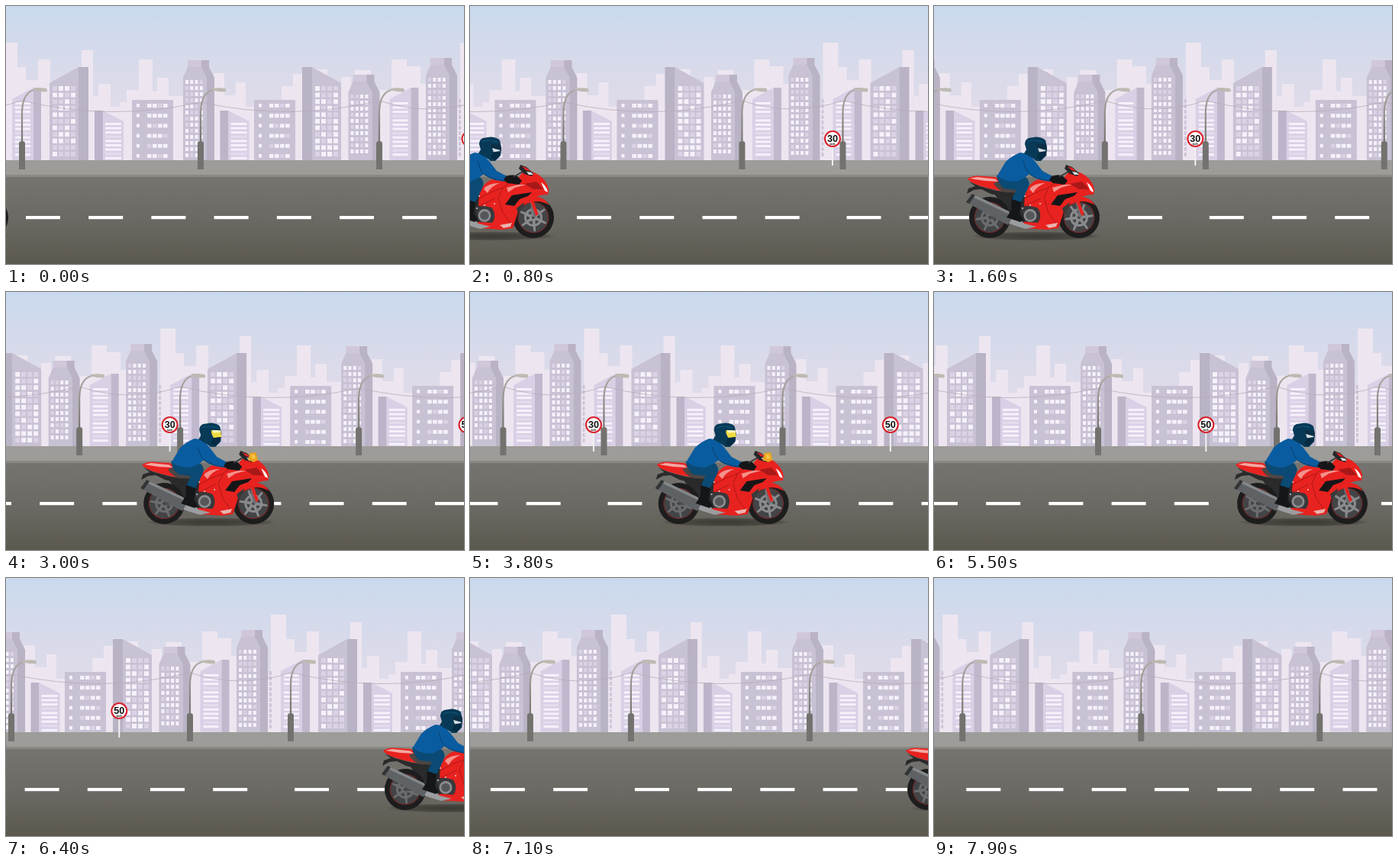
Write an HTML page with a canvas that moves like this. It is 600 by 338 pixels and loops after 8000 ms.

```html
<!DOCTYPE html>
<html lang="en">
<head>
<meta charset="utf-8">
<title>City ride</title>
<style>
  html, body { margin: 0; width: 100%; height: 100%; overflow: hidden; }
  canvas { display: block; width: 600px; height: 338px; }
</style>
</head>
<body>
<canvas id="stage" width="600" height="338"></canvas>
<script>
const ctx = document.getElementById('stage').getContext('2d');
const LOOP = 8000, TICK = 100, TILE = 600, GROUND = 202;

// [time, value] pairs, joined by straight lines
const SCROLL = [[0, 0], [1955, 324], [5000, 524.6], [5500, 640], [6400, 848], [7730, 1156], [8000, 1200]];
const RIDE = [[0, -214], [1955, 47.5], [5100, 308.5], [5500, 351], [6400, 450], [8000, 626]];
const ALERT = [1955, 5000];

const FACE = '#c9c1d4', SIDE = '#bab2c5', PALE = '#d9d0e6', LIT = '#f6f1fa', DIM = '#dbd3e5';
const RED = '#e8221f', DEEP = '#a81818', BLACK = '#151618';

function track(keys, t) {
  let i = 1;
  while (i < keys.length - 1 && t > keys[i][0]) i++;
  const [t0, a] = keys[i - 1], [t1, b] = keys[i];
  return a + (b - a) * (t - t0) / (t1 - t0);
}

function rect(x, y, w, h, color) {
  ctx.fillStyle = color;
  ctx.fillRect(x, y, w, h);
}

function poly(color, ...p) {
  ctx.fillStyle = color;
  ctx.beginPath();
  for (let i = 0; i < p.length; i += 2) ctx.lineTo(p[i], p[i + 1]);
  ctx.fill();
}

function shape(color, d) {
  ctx.fillStyle = color;
  ctx.fill(new Path2D(d));
}

function stroke(color, width, d) {
  ctx.strokeStyle = color;
  ctx.lineWidth = width;
  ctx.stroke(new Path2D(d));
}

function disc(x, y, r, color) {
  ctx.fillStyle = color;
  ctx.beginPath();
  ctx.arc(x, y, r, 0, Math.PI * 2);
  ctx.fill();
}

function ring(r, width, color) {
  ctx.strokeStyle = color;
  ctx.lineWidth = width;
  ctx.beginPath();
  ctx.arc(0, 0, r, 0, Math.PI * 2);
  ctx.stroke();
}

function fade(y0, y1, ...colors) {
  const g = ctx.createLinearGradient(0, y0, 0, y1);
  colors.forEach((c, i) => g.addColorStop(i / (colors.length - 1), c));
  return g;
}

const SKY = fade(0, GROUND, '#c9d9ed', '#d6daeb', '#e0dbe9', '#e8dfeb');
const ROAD = fade(224, 338, '#757470', '#6b6963', '#5b584e');
const POLE = fade(108, 178, '#aeaba5', '#77756f');

function windows(x, y, cols, w, dx, h, dy, seed, share) {
  for (let r = 0; y + r * dy + h < 200; r++) {
    for (let c = 0; c < cols; c++) {
      const n = Math.sin(seed * 17.3 + r * 12.9898 + c * 78.233) * 43758.5453;
      rect(x + c * dx, y + r * dy, w, h, n - Math.floor(n) < share ? LIT : DIM);
    }
  }
}

function bars(x, y, w) {
  for (let i = 0; y + i * 5.6 < 198; i++) rect(x, y + i * 5.6, w, 3, i % 4 === 3 ? '#e3dced' : LIT);
}

// Left, right and top of the hazy towers
const HAZE = [
  -5, 15, 48, 15, 26, 80, 26, 42, 97, 42, 58, 70, 99, 114, 58, 114, 121, 118,
  121, 137, 102, 149, 158, 126, 158, 174, 110, 174, 192, 70, 192, 198, 112,
  198, 213, 94, 213, 232, 118, 272, 286, 88, 286, 301, 117, 301, 314, 100,
  361, 376, 105, 376, 388, 89, 405, 421, 83, 439, 452, 93, 457, 478, 84,
  489, 505, 110, 505, 525, 70, 525, 543, 79, 543, 552, 102
];

function haze() {
  rect(0, 132, TILE, 70, '#ede6f0');
  for (let i = 0; i < HAZE.length; i += 3) {
    const [l, r, top] = HAZE.slice(i, i + 3);
    rect(l, top, r - l, GROUND - top, '#ede6f0');
  }
}

function slantLow(x) {
  poly(PALE, x, GROUND, x, 122, x + 28, 107, x + 28, GROUND);
  rect(x + 28, 107, 10, GROUND - 107, '#c1b8cd');
  bars(x + 4, 126, 20);
}

function slantTall(x, flip) {
  ctx.save();
  ctx.translate(x + (flip ? 51 : 0), 0);
  if (flip) ctx.scale(-1, 1);
  poly(FACE, 0, GROUND, 0, 101, 38, 80, 38, GROUND);
  rect(38, 80, 13, GROUND - 80, SIDE);
  windows(4, 105, 4, 6, 8, 6, 8.6, flip ? 8 : 3, 0.45);
  ctx.restore();
}

function annex(x) {
  rect(x, 137, 11, GROUND - 137, '#bdb4c9');
  poly(PALE, x + 11, GROUND, x + 11, 137, x + 38, 151, x + 38, GROUND);
  bars(x + 14, 153, 21);
}

function block(x) {
  rect(x, 123, 54, GROUND - 123, FACE);
  for (let y = 128; y < 197; y += 13.2) {
    rect(x + 6, y, 4, 4.6, LIT);
    for (let i = 0; i < 4; i++) rect(x + 20 + i * 7, y, 5.6, 5, (i + y | 0) % 5 ? LIT : DIM);
  }
}

function tower(x, y, seed) {
  poly(FACE, x, GROUND, x, y + 23, x + 6, y + 9, x + 26, y + 9, x + 31, y + 23, x + 31, GROUND);
  rect(x + 6, y, 19, 9, '#d0c8da');
  poly(SIDE, x + 24, y, x + 34, y, x + 34, y + 9, x + 41, y + 23, x + 41, GROUND,
    x + 31, GROUND, x + 31, y + 23, x + 24, y + 9);
  windows(x + 3, y + 26, 4, 4, 6.3, 5, 8, seed, 0.75);
}

function city() {
  slantLow(8);
  slantTall(57, false);
  annex(116);
  block(165);
  tower(232, 71, 1);
  annex(280.5);
  block(325);
  slantTall(388, true);
  tower(448.5, 90, 5);
  slantLow(502.5);
  tower(550, 68, 7);
  for (let y = 122; y < 199; y += 7) rect(593, y, 3, 5, '#cfc6da');
}

function street() {
  stroke('#b6aeb8', 0.8, 'M21 124Q138 152 255 126Q372 152 489 124Q555 146 621 124');
  for (const x of [21, 255, 489]) {
    stroke(POLE, 2.2, `M${x} 180V138Q${x + 1} 112 ${x + 18} 109.5`);
    shape('#bdbab2', `M${x + 15} 108Q${x + 25} 106.5 ${x + 32} 108Q${x + 34} 110.5 ${x + 32} 112.5L${x + 23} 112Q${x + 19} 110.5 ${x + 15} 111Z`);
    shape('#74726e', `M${x - 4} 214V180Q${x - 4} 177 ${x} 177Q${x + 4} 177 ${x + 4} 180V214Z`);
  }
  for (let i = 0; i < 7; i++) rect(26 + i * 82.2, 275, 45, 4.2, '#fff');
}

function sign(x, limit) {
  rect(x - 1, 184, 2, 25, '#f2f1f2');
  disc(x, 174, 11, '#d9202a');
  disc(x, 174, 8.9, '#fff');
  ctx.fillStyle = '#111';
  ctx.textAlign = 'center';
  ctx.font = 'bold 12.6px "Liberation Sans", Arial, sans-serif';
  ctx.fillText(limit, x, 178);
  ctx.font = 'bold 3px "Liberation Sans", Arial, sans-serif';
  ctx.fillText('km/h', x, 181.7);
}

function wheel(x, angle, metal) {
  ctx.save();
  ctx.translate(x, 277);
  ctx.rotate(angle);
  disc(0, 0, 27, '#1d1d1e');
  disc(0, 0, 19.5, '#434446');
  ring(19.8, 1, '#7c2b2b');
  for (let i = 0; i < 6; i++) {
    ctx.rotate(Math.PI / 3);
    poly(metal, -2, 4, -1.3, 18.5, 1.3, 18.5, 2, 4);
  }
  ring(10.5, 3, metal);
  disc(0, 0, 5, metal);
  disc(0, 0, 2, '#3d3e40');
  ctx.restore();
}

function shadow() {
  ctx.save();
  ctx.translate(134, 301.5);
  ctx.scale(1, 0.07);
  const g = ctx.createRadialGradient(0, 0, 20, 0, 0, 86);
  g.addColorStop(0, 'rgba(25,24,20,.5)');
  g.addColorStop(0.7, 'rgba(25,24,20,.33)');
  g.addColorStop(1, 'rgba(25,24,20,0)');
  disc(0, 0, 86, g);
  ctx.restore();
}

function bike(angle, alert) {
  // Frame, wheels and engine
  shape('#2a2b2d', 'M76 242L122 244L160 250L166 287L112 289L100 272L86 256Z');
  wheel(73, angle, '#6b6d6f');
  wheel(190, angle, '#898b8e');
  stroke('#4a4c4f', 5, 'M73 277L112 272');

  // Tail and seat
  shape('#2b2a2b', 'M46 230L60 236L86 243L104 245L100 252L74 246L62 240L52 241L43 246L45 239L54 236Z');
  shape(RED, 'M44 226.5Q49 222.5 57 222.5L80 224L98 235L92 243Q74 240 62 236Q50 233 44 226.5Z');
  shape('#f3a7a3', 'M47 226L56 224L80 226.5L84 230L66 229Z');
  shape('#4c4644', 'M78 232Q88 227 100 233L124 238L119 245L92 244Q82 240 78 232Z');

  // Fork and fender
  stroke('#6d7073', 4, 'M185 244L192 277');
  stroke(RED, 4, 'M187 252L195 274');
  shape(RED, 'M168 267Q174 251 190 249Q204 250 211 261Q199 254 187 257Q176 260 168 267Z');

  // Fairing
  shape(RED, 'M119 247Q122 234 134 228Q148 224 158 231L169 232Q170 221 178 217L191 218Q202 223 207 232Q212 240 209 247Q200 247 192 251L182 257Q170 265 168 276L163 291L149 293L117 291L112 285L121 282L137 283Q141 272 135 264L118 262Z');
  shape('#38393b', 'M113 264Q126 259 137 266Q142 276 136 284L120 283Z');
  disc(126, 274.5, 8.5, '#8b8d90');
  disc(126, 274.5, 5.8, '#55585b');
  stroke(DEEP, 0.9, 'M119 252Q132 244 150 238L158 232M150 238L144 251L150 271L163 289M119 262L140 252');
  shape(BLACK, 'M153 260L162 248L188 244L183 249L172 253L165 262Z');
  shape('#38393b', 'M168 265L178 257L176 264L170 272Z');
  shape('#f5928c', 'M125 240Q130 232 146 232Q134 236 130 245Z');
  shape('#f5928c', 'M155 238L170 234L181 234L166 238L157 244Z');
  shape(DEEP, 'M178 233L194 230L203 240L190 240Z');
  shape('#e9b3ae', 'M146 287L162 284L160 289L151 291Z');
  shape('#fff', 'M200 231Q207 235 209 244L205 242Z');
  for (const [x, y] of [[119, 249], [126, 261], [116, 265], [139, 259]]) disc(x, y, 0.9, '#ddd');

  // Exhaust
  shape('#9b9da0', 'M94 274L108 275L118 285L134 289L120 292L104 287L94 283Z');
  shape('#5f6265', 'M42 257L50 246L98 269L102 278L97 287Z');
  shape('#85888b', 'M48 249L50 246L98 269L99 273Z');
  shape('#323436', 'M42 257L50 246L54 248L46 259Z');

  // Screen and mirror
  shape('#25272a', 'M173 208L181 211L190 219L188 223L178 220L171 213Z');
  shape(RED, 'M175 210L181 212L187 217L180 215Z');
  shape('#dfe3e6', 'M181 217L187 218L190 221L184 221Z');
  if (alert) {
    shape('#eaa321', 'M185 211L193 210L196 220L190 223L183 220Z');
    shape('#f7c546', 'M187 213L191 213L193 218L188 219Z');
  }

  // Rider
  shape(BLACK, 'M102 250L115 253L112 272L117 280L113 283L95 277L101 268Z');
  shape('#0a4a74', 'M82 222Q96 217 121 225Q127 231 123 239L114 257L102 253L108 241L92 239Q84 234 82 222Z');
  shape('#0a5ca0', 'M113 192Q102 196 94 204L83 222Q90 230 108 230L120 224L125 220Q134 229 155 230L157 224L142 216L132 203L124 194Z');
  stroke('#073f6b', 1, 'M117 203Q120 215 126 221Q138 228 154 229');
  shape(BLACK, 'M154 223Q163 220 169 223L175 229L171 234L156 232L151 228Z');
  stroke('#34373a', 2, 'M164 224L176 217');
  shape('#083a58', 'M119 181Q119 175 124 173L134 171.5Q143 172 146 176L148 185L147 196L140 203L134 203L127 198L118 193L121 188Z');
  shape(alert ? '#f1dc3f' : '#0d2f45', 'M135 181L147 181.5L148 190L138 191Q134 186 135 181Z');
  if (alert) shape('#fdf7c4', 'M136 181L147 181.5L147 184L138 184.5Z');
  else shape('#d5dde2', 'M136 186L147 189L144 192L138 192Z');
  shape('#062c44', 'M137 191.5L147 190L146.5 195L140 202L134 199Z');
  stroke('#135577', 1.2, 'M123 178Q131 174 142 178');
}

function tiles(s, paint) {
  for (let k = -1; k < 2; k++) {
    ctx.save();
    ctx.translate(k * TILE - s % TILE, 0);
    paint();
    ctx.restore();
  }
}

function draw(t) {
  const s = track(SCROLL, t), x = track(RIDE, t);
  rect(0, 0, 600, GROUND, SKY);
  tiles(s, haze);
  tiles(s, city);
  rect(0, GROUND, 600, 19, '#9d9c98');
  rect(0, 221, 600, 3, '#8a8984');
  rect(0, 224, 600, 114, ROAD);
  tiles(s, street);
  sign(607.5 - s, '30');
  sign(996.3 - s, '50');
  ctx.save();
  ctx.translate(x, 0);
  shadow();
  bike((s + x) / 27, t >= ALERT[0] && t < ALERT[1]);
  ctx.restore();
}

const start = performance.now();

function frame() {
  const t = (performance.now() - start) % LOOP;
  draw(Math.floor(t / TICK) * TICK);
  requestAnimationFrame(frame);
}
frame();
</script>
</body>
</html>
```
